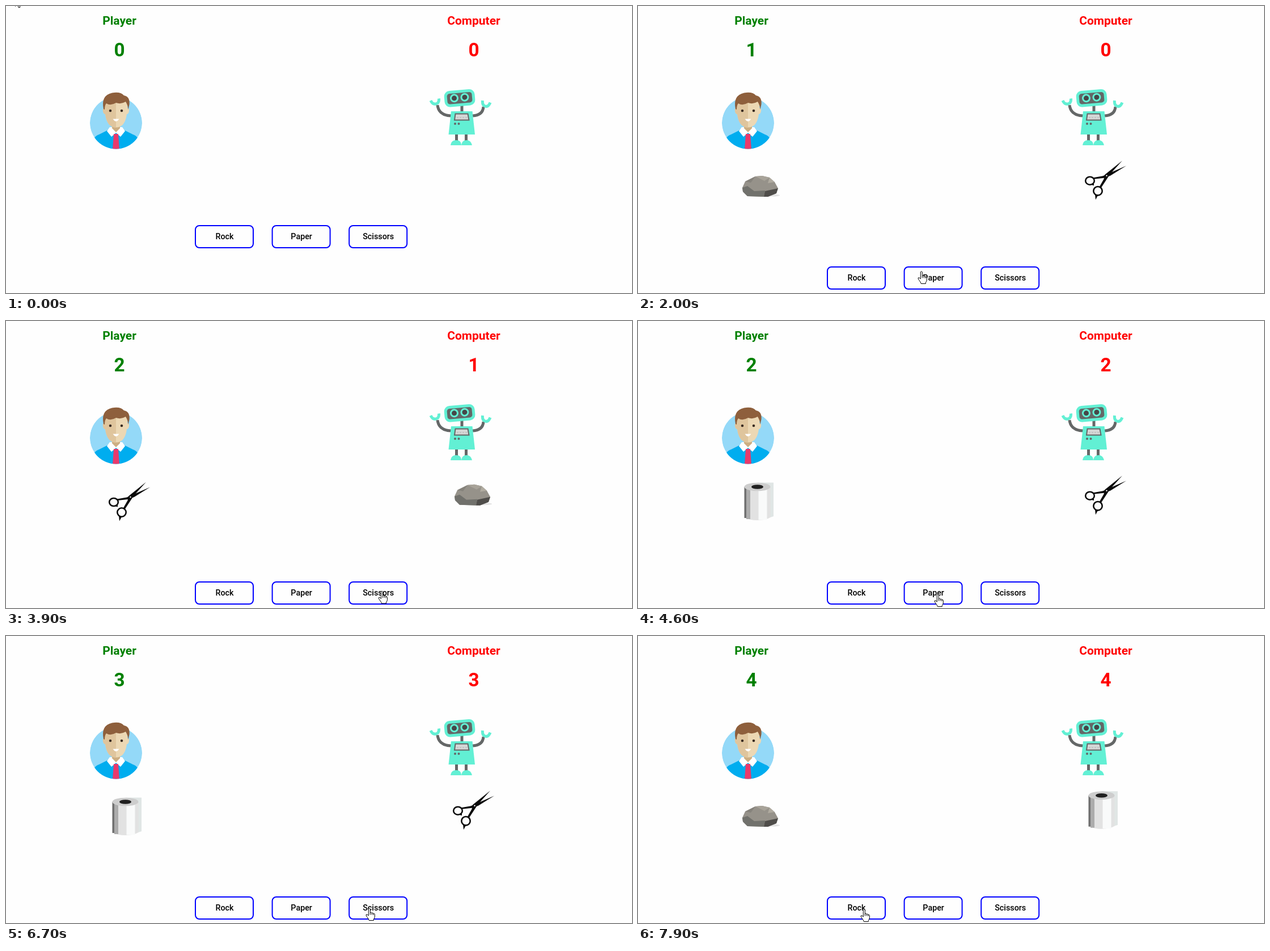
Animation, 1104 px wide and 507 px high, one loop 8000 ms. Source, as an HTML page:

```html
<!DOCTYPE html>
<html lang="en">
<head>
<meta charset="utf-8">
<title>Rock Paper Scissors</title>
<style>
  html, body { margin: 0; width: 100%; height: 100%; overflow: hidden; background: #fefefe; }
  svg { display: block; width: 1104px; height: 507px; }
  text { font-family: Roboto, sans-serif; text-anchor: middle; }
  .title { font-size: 21px; font-weight: 700; }
  .score { font-size: 33.3px; font-weight: 700; }
  .player { fill: #008000; }
  .computer { fill: #f00; }
  .button rect { fill: #fefefe; stroke: #00f; stroke-width: 2; }
  .button text { font-size: 14.3px; font-weight: 500; }
  .steel { fill: #646767; }
  .mint { fill: #62f0d4; }
  .steel-line { fill: none; stroke: #646767; stroke-width: 5; }
  .mint-line { fill: none; stroke: #62f0d4; stroke-width: 5; }
</style>
</head>
<body>
<svg viewBox="0 0 1104 507">
  <defs>
    <clipPath id="disc"><circle cx="194" cy="206.5" r="46"/></clipPath>
    <clipPath id="leftHalf"><path d="M148 150H194V260H148Z"/></clipPath>

    <g id="rock">
      <ellipse cx="236" cy="334.5" rx="14" ry="2" fill="#e2e2e2"/>
      <path d="M184 321L189 310 207 301 219 300 232 303 241 311 247 322 244 331 229 337 193 336 185 328Z" fill="#96928a"/>
      <path d="M207 301L219 300 232 303 223 309Z" fill="#a8a399"/>
      <path d="M189 310L207 301 199 312Z" fill="#85827b"/>
      <path d="M232 303L241 311 229 313Z" fill="#b0aba0"/>
      <path d="M184 321L193 318 205 327 224 326 222 337 193 336 185 328Z" fill="#71716c"/>
      <path d="M224 327L247 322 244 331 229 337 222 337Z" fill="#4f4d4a"/>
    </g>

    <g id="paper">
      <path d="M211 285.5H239V345L233 347Z" fill="#e0e6e5"/>
      <path d="M187.5 293V347Q198 352.5 212 352T233.5 347V293Z" fill="#e2e2e2"/>
      <path d="M189.3 293V348" stroke="#707070" stroke-width="3.6"/>
      <path d="M194.5 293V350" stroke="#acacac" stroke-width="7"/>
      <path d="M220 297V351.5" stroke="#f9fafa" stroke-width="15"/>
      <ellipse cx="210.500" cy="293" rx="23" ry="7.3" fill="#cdcdcd"/>
      <ellipse cx="210.500" cy="293" rx="10.500" ry="3.800" fill="#202020"/>
    </g>

    <g id="scissors" fill="#0b0b0b">
      <g fill="none" stroke="#0b0b0b" stroke-width="2.600">
        <ellipse cx="190" cy="320" rx="7.800" ry="7"/>
        <circle cx="204" cy="338" r="7.700"/>
      </g>
      <path d="M192 327L197 324V328.500ZM199 344.500L204 346 200 353.500Z"/>
      <path d="M196 314.500L213 311.500 254 293.500 226 311 215 315 197 317Z"/>
      <path d="M206.500 331L214.500 317 216 309.500 247 284.500 225 309 210 332Z"/>
      <circle cx="219.500" cy="311" r="1.200" fill="#fefefe"/>
    </g>
  </defs>

  <g id="avatar">
    <g clip-path="url(#disc)">
      <circle cx="194" cy="206.500" r="46" fill="#94d9f8"/>
      <path d="M146 258Q152 230 164 227L184 217H204L224 227Q236 230 242 258Z" fill="#00adef"/>
      <path d="M183 214L178 221 186 231 194 224 202 231 210 221 205 214Z" fill="#fff"/>
      <path d="M190 226H198L200 254H188Z" fill="#e83a6c"/>
    </g>
    <path d="M187 203H201V216L194 223 187 216Z" fill="#cdae82"/>
    <g id="face">
      <path id="head" d="M174 163H214V180Q218 180 217 186 216 191 213 191 210 214.500 194 214.500 178 214.500 175 191 172 191 171 186 170 180 174 180Z" fill="#ecd8b4"/>
      <use href="#face-shade"/>
      <path d="M174 163H194V214.500Q178 214.500 175 191 172 191 171 186 170 180 174 180Z" fill="#dfc59d"/>
    </g>
    <path d="M172 182Q167 158 187 153.500 202 151 208 158 219 160 217.500 174L215.500 183Q215 175 211 169 203 174 194 171 184 177 177 172 174 175 174 183Z" fill="#8e5f3c"/>
    <g fill="#3a2c22"><circle cx="184" cy="185" r="2.300"/><circle cx="204" cy="185" r="2.300"/></g>
    <path d="M188.500 199.500H199.500Q194 208 188.500 199.500Z" fill="#fff"/>
  </g>

  <g id="robot">
    <path class="steel-line" d="M785 194Q763 193 761 175M823 194Q841 193 842 178M804 176V187M794.500 226V239M811.500 226V239"/>
    <path class="mint-line" d="M749 167Q752 174 758 173T763.500 163.500M840.500 167Q839.500 175 845 177T854 170.500"/>
    <g transform="rotate(-5 800 162.500)">
      <rect class="steel" x="775.500" y="151" width="49" height="23.500" rx="7" stroke="#62f0d4" stroke-width="5"/>
      <g fill="#454849" stroke="#62f0d4" stroke-width="3">
        <circle cx="790.500" cy="162" r="6"/><circle cx="809" cy="162" r="6"/>
      </g>
    </g>
    <path class="mint" d="M785 186H822.500L827 227H780.500Z"/>
    <path d="M792.500 190.500H814.500L816.500 201.500H791Z" fill="#d5d7d6" stroke="#646767" stroke-width="2"/>
    <path d="M795 197H813" stroke="#aeb2b1" stroke-dasharray="3 2"/>
    <g class="steel"><circle cx="792" cy="208" r="2"/><circle cx="798.500" cy="208" r="2"/></g>
    <path class="mint" d="M784 246Q785 237 794 237T803 246Q804 237 812 237T822 246Z"/>
  </g>

  <text class="title player" x="200" y="32.500">Player</text>
  <text class="title computer" x="825" y="32.500">Computer</text>
  <text class="score player" id="playerScore" x="200" y="89"></text>
  <text class="score computer" id="computerScore" x="825" y="89"></text>

  <use id="playerPick"/>
  <use id="computerPick" transform="translate(607 -11.300)"/>

  <g id="buttons"></g>

  <g id="cursor" fill="#fff" stroke="#000" stroke-linejoin="round">
    <path id="arrow" d="M.5 .5V15.500L4 12.200 6.500 18 9 17 6.500 11.200H11Z"/>
    <g id="hand" transform="translate(.8 0)">
      <path d="M-1.500 13V1Q0-2 1.500 1V7.500Q3.500 6.500 4.300 8.300 6.300 7.300 7 9.300 9.300 8.500 9.500 11V15Q9.500 17 7.500 19.500V21.500H-.5Q-1 19-4 15.500-6.500 12.500-5.500 11-4 10-1.500 13Z"/>
      <path d="M1.500 7.500V11.500M4.300 8.300V11.500M7 9.300V12" fill="none"/>
    </g>
  </g>
</svg>

<script>
  const LOOP = 8000;
  const TICK = 100;
  const REVEAL = 1100;
  const BUTTON = { top: 387, drop: 73, left: 333, pitch: 135.6, width: 104, height: 41 };
  const LABELS = ['Rock', 'Paper', 'Scissors'];
  const BEATS = { rock: 'scissors', paper: 'rock', scissors: 'paper' };
  const $ = id => document.getElementById(id);

  const rounds = [
    { at: REVEAL, player: 'rock', computer: 'scissors' },
    { at: 2300, player: 'paper', computer: 'rock' },
    { at: 3700, player: 'scissors', computer: 'rock' },
    { at: 4600, player: 'paper', computer: 'scissors' },
    { at: 5500, player: 'rock', computer: 'scissors' },
    { at: 6300, player: 'paper', computer: 'scissors' },
    { at: 6900, player: 'scissors', computer: 'paper' },
    { at: 7700, player: 'rock', computer: 'paper' }
  ];

  // each move eases from the previous resting place; sag bows the path downwards
  const moves = [
    { from: 0, to: 0, x: 16, y: -15 },
    { from: 200, to: 800, x: 384, y: 407 },
    { from: 1400, to: 1800, x: 501, y: 471, sag: 12 },
    { from: 2000, to: 2000, x: 499, y: 469 },
    { from: 2400, to: 3000, x: 711, y: 476, sag: 20 },
    { from: 3500, to: 3600, x: 684, y: 477 },
    { from: 3900, to: 4200, x: 535, y: 480 },
    { from: 4400, to: 4400, x: 528, y: 483 },
    { from: 4700, to: 5300, x: 391, y: 487, sag: 8 },
    { from: 5600, to: 6000, x: 528, y: 482, sag: 8 },
    { from: 6400, to: 6700, x: 640, y: 481 },
    { from: 7000, to: 7200, x: 410, y: 485, sag: 6 },
    { from: 7400, to: 7500, x: 398, y: 483 }
  ];

  const buttonLeft = i => BUTTON.left + BUTTON.pitch * i;

  $('buttons').innerHTML = LABELS.map((label, i) => `
    <g class="button" transform="translate(${buttonLeft(i)} ${BUTTON.top})">
      <rect x="1" y="1" width="${BUTTON.width - 2}" height="${BUTTON.height - 2}" rx="7"/>
      <text x="52.500" y="25">${label}</text>
    </g>`).join('');

  function cursorAt(time) {
    const index = moves.findLastIndex(move => move.from <= time);
    const { from, to, x, y, sag = 0 } = moves[index];
    const last = moves[index - 1] ?? moves[index];
    const step = Math.floor((time - from) / TICK) + 1;
    const progress = Math.min(1, step / ((to - from) / TICK + 1));
    const eased = (1 - Math.cos(Math.PI * progress)) / 2;
    return {
      x: last.x + (x - last.x) * eased,
      y: last.y + (y - last.y) * eased + sag * Math.sin(Math.PI * eased)
    };
  }

  function isOverButton({ x, y }, top) {
    return y >= top && y <= top + BUTTON.height &&
      LABELS.some((_, i) => x >= buttonLeft(i) && x <= buttonLeft(i) + BUTTON.width);
  }

  function draw(time) {
    const played = rounds.filter(round => round.at <= time);
    const wins = (me, other) => played.filter(round => BEATS[round[me]] === round[other]).length;
    const current = played.at(-1);
    $('playerScore').textContent = wins('player', 'computer');
    $('computerScore').textContent = wins('computer', 'player');
    $('playerPick').setAttribute('href', '#' + (current?.player ?? ''));
    $('computerPick').setAttribute('href', '#' + (current?.computer ?? ''));

    const dropAt = t => t < REVEAL ? 0 : BUTTON.drop;
    $('buttons').setAttribute('transform', `translate(0 ${dropAt(time)})`);

    // the pointer shape reacts one tick after the buttons move
    const cursor = cursorAt(time);
    const hand = isOverButton(cursor, BUTTON.top + dropAt(time - TICK));
    $('cursor').setAttribute('transform', `translate(${cursor.x} ${cursor.y})`);
    $('hand').style.display = hand ? '' : 'none';
    $('arrow').style.display = hand ? 'none' : '';
  }

  const start = performance.now();
  function tick() {
    draw((performance.now() - start) % LOOP);
    requestAnimationFrame(tick);
  }
  tick();
</script>
</body>
</html>
```
